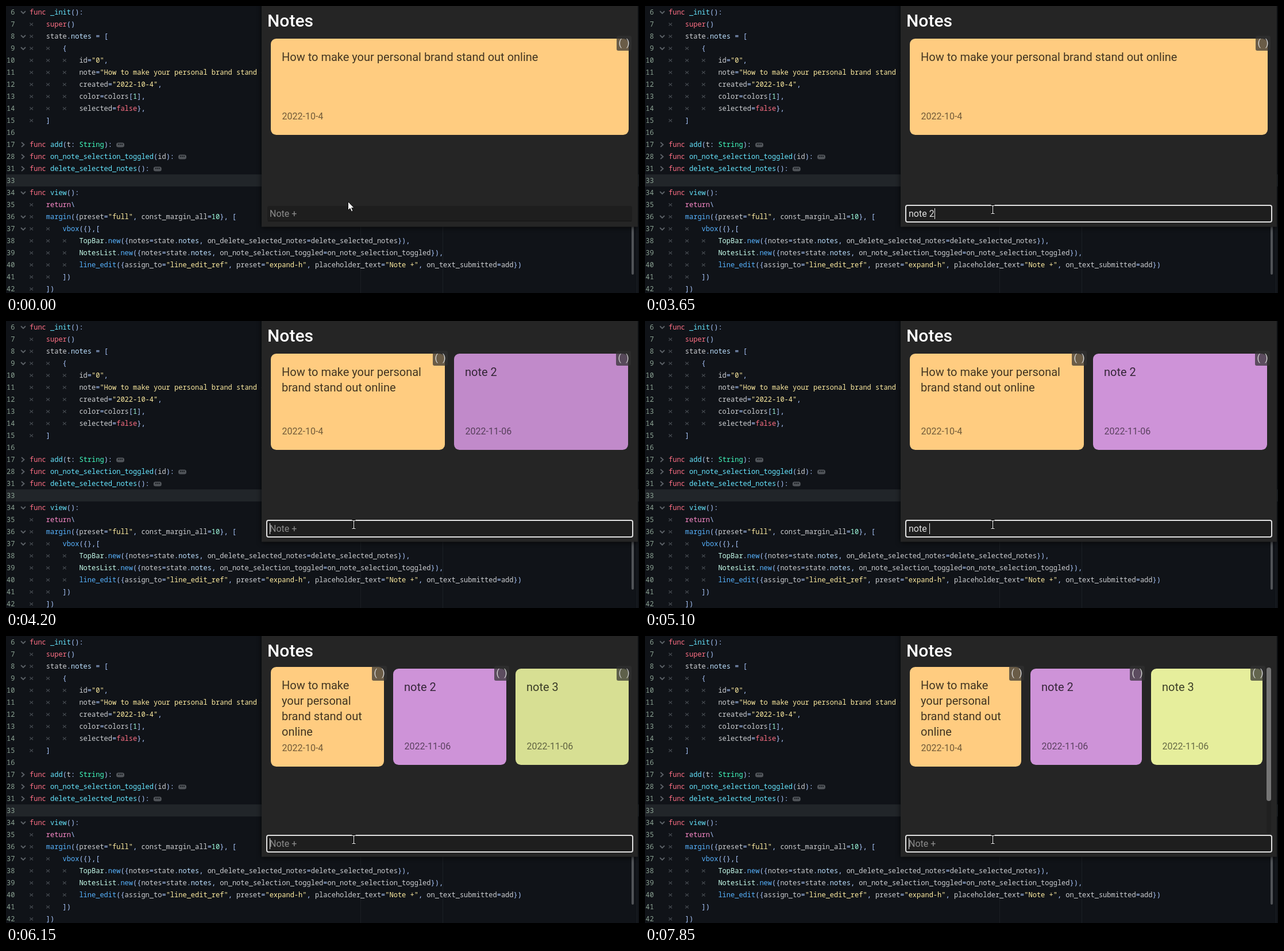
Animation, 1102 px wide and 501 px high, one loop 8 s. Source, as an HTML page:

```html
<!DOCTYPE html>
<html lang="en">
<head>
<meta charset="utf-8">
<title>Notes</title>
<style>
html, body { margin: 0; width: 100%; height: 100%; overflow: hidden; background: #101318; }
svg { display: block; }
text { white-space: pre; }
#code { font: 12px "Noto Sans Mono", monospace; }
#app { font: 16px Roboto, sans-serif; }
.num { fill: #8ba293; text-anchor: end; }
.mark { fill: none; stroke: #454a50; stroke-width: 1.1; }
.fold { fill: none; stroke: #5b6066; stroke-width: 1.9; }
.title { font-size: 20px; fill: #000; fill-opacity: .74; }
.date { fill: #000; fill-opacity: .56; }
.plain { fill: #cdcfd2; }
.key { fill: #ff7085; }
.flow { fill: #ff8ccc; }
.def { fill: #66e6ff; }
.call { fill: #57b3ff; }
.str { fill: #ffeda1; }
.sym { fill: #abc9ff; }
.digit { fill: #a1ffe0; }
.type { fill: #42ffc2; }
.user { fill: #c7ffed; }
.member { fill: #bce0ff; }
#panel { filter: drop-shadow(0 1px 4px rgba(0, 0, 0, .75)); }
</style>
</head>
<body>
<svg width="1102" height="501" viewBox="0 0 1102 501">
  <rect width="1102" height="501" fill="#101318"/>
  <rect y="294" width="1102" height="21" fill="#212529"/>
  <path d="M617.5 0V501M760.5 0V501" stroke="#1b1f24"/>
  <g id="code"></g>
  <rect x="1089" y="300" width="4" height="169" rx="2" fill="#505357"/>
  <path d="M1098.5 0V501" stroke="#1c2025"/>
  <g id="app">
    <rect id="panel" x="445" y="-10" width="655" height="395.5" fill="#252525"/>
    <text x="455" y="36" font-size="30" font-weight="500" fill="#fff">Notes</text>
    <g id="cards"></g>
    <g id="bar">
      <rect x="1082" y="55" width="8" height="290" rx="4" fill="#202020"/>
      <rect x="1082" y="55" width="8" height="233" rx="4" fill="#757575"/>
    </g>
    <rect x="455" y="349" width="635" height="27" rx="3" fill="#1e1e1e"/>
    <path id="rule" d="M456 375.5H1089" stroke="#131313"/>
    <rect id="focus" x="454" y="348" width="637" height="29" rx="3" fill="none" stroke="#e0e0e0" stroke-width="2"/>
    <text id="field" x="459" y="368"></text>
    <rect id="caret" y="353" width="1" height="19" fill="#e8e8e8"/>
  </g>
  <path id="arrow" d="M.5 .5V15.5L4 12.3L6.4 17.7L9 16.6L6.6 11.4H11Z" fill="#fff" stroke="#111"/>
  <g id="beam" fill="none">
    <path d="M-3-7H-1L0-6L1-7H3M0-6V6M-3 7H-1L0 6L1 7H3" stroke="#000" stroke-width="3"/>
    <path d="M-3-7H-1L0-6L1-7H3M0-6V6M-3 7H-1L0 6L1 7H3" stroke="#fff" stroke-width="1.1"/>
  </g>
</svg>
<script>
const $ = id => document.getElementById(id);

// Each row: line number, indent, code
const rows = [
  [6, 0, 'func _init():'],
  [7, 1, 'super()'],
  [8, 1, 'state.notes = ['],
  [9, 2, '{'],
  [10, 3, 'id="0",'],
  [11, 3, 'note="How to make your personal brand stand out online",'],
  [12, 3, 'created="2022-10-4",'],
  [13, 3, 'color=colors[1],'],
  [14, 3, 'selected=false},'],
  [15, 1, ']'],
  [16, 0, ''],
  [17, 0, 'func add(t: String):'],
  [28, 0, 'func on_note_selection_toggled(id):'],
  [31, 0, 'func delete_selected_notes():'],
  [33, 0, ''],
  [34, 0, 'func view():'],
  [35, 1, 'return\\'],
  [36, 1, 'margin({preset="full", const_margin_all=10}, ['],
  [37, 2, 'vbox({},['],
  [38, 3, 'TopBar.new({notes=state.notes, on_delete_selected_notes=delete_selected_notes}),'],
  [39, 3, 'NotesList.new({notes=state.notes, on_note_selection_toggled=on_note_selection_toggled}),'],
  [40, 3, 'line_edit({assign_to="line_edit_ref", preset="expand-h", placeholder_text="Note +", on_text_submitted=add})'],
  [41, 2, '])'],
  [42, 1, '])']
];
const folded = [17, 28, 31];
const words = { func: 'key', super: 'key', false: 'key', return: 'flow', String: 'type', TopBar: 'user', NotesList: 'user' };

function kind(token, at, line) {
  if (token[0] === '"') return 'str';
  if (/\d/.test(token[0])) return 'digit';
  if (!/\w/.test(token[0])) return 'sym';
  if (words[token]) return words[token];
  if (line[at + token.length] === '(') return line.slice(0, at) === 'func ' ? 'def' : 'call';
  return line[at - 1] === '.' ? 'member' : 'plain';
}

const paint = line => line.replace(/"[^"]*"|\w+|[^\w\s"]+/g,
  (token, at) => `<tspan class="${kind(token, at, line)}">${token}</tspan>`);

function codeRow([num, indent, line], i) {
  const y = 11 + 21 * i;
  const x = 41 + 28.8 * indent;
  let out = `<text class="num" x="15.5" y="${y + 4}">${num}</text><text x="${x}" y="${y + 4}">${paint(line)}</text>`;
  for (let k = 0; k < indent; k++) {
    out += `<path class="mark" d="M${41.5 + 28.8 * k} ${y - 2.5}l2.5 2.5l-2.5 2.5m5.5-5l-2.5 2.5l2.5 2.5"/>`;
  }
  if (folded.includes(num)) {
    const end = x + line.length * 7.2 + 7;
    out += `<path class="fold" d="M27 ${y - 4}l4.5 4l-4.5 4"/>
      <rect x="${end}" y="${y - 3.5}" width="14" height="8" rx="3.5" fill="#505459"/>
      <path d="M${end + 3} ${y - .5}h2m1 0h2m1 0h2" stroke="#15181d" stroke-width="2"/>`;
  } else if (/[:[{]$/.test(line)) {
    out += `<path class="fold" d="M26 ${y - 2}l4 4l4-4"/>`;
  }
  return out;
}
$('code').innerHTML = rows.map(codeRow).join('');

const notes = [
  { date: '2022-10-4', color: '#ffcc80' },
  { date: '2022-11-06', color: '#ce93d8' },
  { date: '2022-11-06', color: '#e6ee9c' }
];
const wraps = [
  ['How to make your personal brand stand out online'],
  ['How to make your personal', 'brand stand out online'],
  ['How to make', 'your personal', 'brand stand out', 'online']
];

// Six key presses, then the submit
const typing = [
  [1500, 1700, 2050, 3350, 3500, 3650, 3950],
  [4450, 4600, 4750, 4800, 5100, 5650, 5900],
  [6400, 6550, 6650, 6750, 6950, 7550, 7850]
];
const pointer = [[0, 595, 341], [50, 597, 343], [100, 602, 351], [150, 604, 354], [250, 605, 355]];

const clamp = v => Math.min(1, Math.max(0, v));
const cubic = p => p < .5 ? 4 * p ** 3 : 1 - 4 * (1 - p) ** 3;

function card(i, count, width, alpha) {
  const { date, color } = notes[i];
  const lines = i ? [`note ${i + 1}`] : wraps[count - 1];
  const grow = lines.length > 3 ? 3 : 0;
  const x = 461 + i * (width + 16);
  const right = x + Math.floor(width);
  const left = Math.round(x);
  const text = lines.map((s, k) => `<text class="title" x="${left + 19}" y="${96 - grow + 27 * k}">${s}</text>`).join('');
  return `<g opacity="${alpha}">
    <rect x="${left}" y="${57 - grow}" width="${Math.floor(width)}" height="${168 + 2 * grow}" rx="9.5" fill="${color}"/>
    ${text}<text class="date" x="${left + 19.5}" y="${198 + grow}">${date}</text>
    <rect x="${Math.floor(right) - 21}" y="52" width="26" height="26" rx="3" fill="#303030" fill-opacity=".72"/>
    <text x="${Math.floor(right) - 17.5}" y="70" fill="#d8d8d8">(  )</text></g>`;
}

function drawCards(t) {
  const added = typing.filter(keys => t >= keys[6]).length;
  const count = Math.min(3, added + 1);
  const scroll = added === 3;
  const width = Math.floor(((scroll ? 614 : 623) - 16 * (count - 1)) / count);
  let out = '';
  for (let i = 0; i < count; i++) {
    const alpha = i ? cubic(clamp((t - typing[i - 1][6] - 30) / 300)) : 1;
    out += card(i, count, width, alpha);
  }
  $('cards').innerHTML = out;
  $('bar').style.display = scroll ? '' : 'none';
}

function drawField(t) {
  let value = '';
  typing.forEach((keys, i) => {
    const pressed = keys.filter(k => t >= k).length;
    if (pressed < 7) value += `note ${i + 2}`.slice(0, pressed);
  });
  const focused = t >= 500;
  const field = $('field');
  field.textContent = value || 'Note +';
  field.setAttribute('fill', value ? '#e0e0e0' : '#8c8c8c');
  const advance = value ? field.getComputedTextLength() : 0;
  $('caret').setAttribute('x', Math.round(459 + advance));
  $('caret').style.display = $('focus').style.display = focused ? '' : 'none';
  $('rule').style.display = focused ? 'none' : '';
}

function drawPointer(t) {
  const [, x, y] = pointer.filter(p => t >= p[0]).pop();
  const inside = y > 348;
  $('arrow').style.display = inside ? 'none' : '';
  $('beam').style.display = inside ? '' : 'none';
  $('arrow').setAttribute('transform', `translate(${x} ${y})`);
  $('beam').setAttribute('transform', `translate(${x + .5} ${y + .5})`);
}

let last = -1;
function tick() {
  const t = Math.floor(performance.now() % 8000 / 50) * 50;
  if (t !== last) {
    last = t;
    drawCards(t);
    drawField(t);
    drawPointer(t);
  }
  requestAnimationFrame(tick);
}
tick();
</script>
</body>
</html>
```
